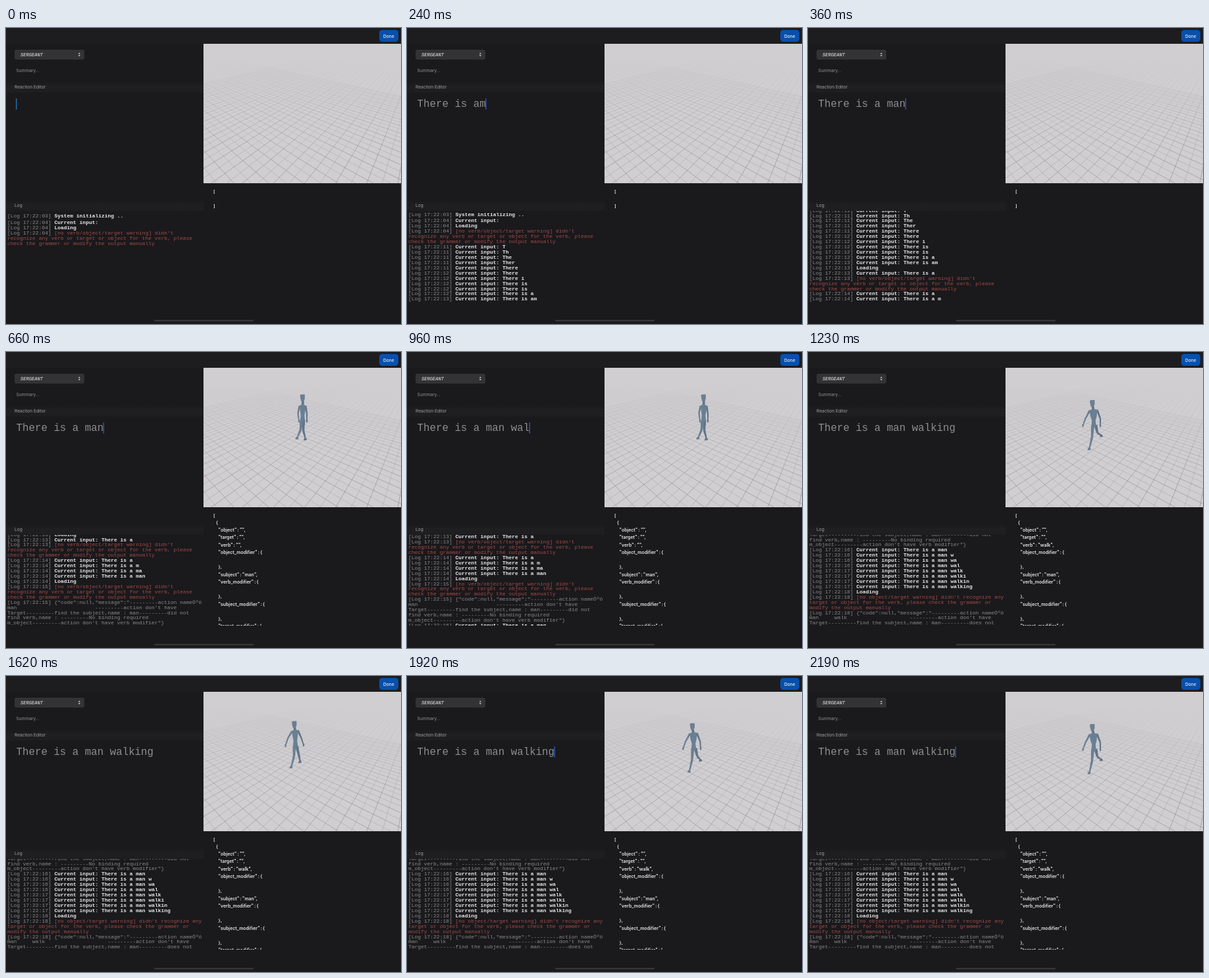
Recreate the animation shown at these times as an HTML page with a canvas. Size 600 by 450 pixels, loop 2220 ms.

```html
<!DOCTYPE html>
<html lang="en">
<head>
<meta charset="utf-8">
<title>Reaction editor</title>
<style>
  html, body { margin: 0; width: 100%; height: 100%; overflow: hidden; background: #1a191c; }
  canvas { display: block; width: 600px; height: 450px; }
</style>
</head>
<body>
<canvas id="stage"></canvas>
<script>
const LOOP = 2220, STEP = 30;
const MONO = '"Liberation Mono", "Courier New", monospace';
const SANS = 'Inter, "Open Sans", sans-serif';
const GREY = '#8a898b', WHITE = '#e9e8e9', RED = '#a24b49';

const canvas = document.getElementById('stage');
const ctx = canvas.getContext('2d');
const dpr = window.devicePixelRatio || 1;
canvas.width = 600 * dpr;
canvas.height = 450 * dpr;

function box(x, y, w, h, color, r = 0) {
  ctx.fillStyle = color;
  ctx.beginPath();
  ctx.roundRect(x, y, w, h, r);
  ctx.fill();
}

function text(str, x, y, font, color) {
  ctx.font = font;
  ctx.fillStyle = color;
  ctx.fillText(str, x, y);
}

function poly(points, color) {
  ctx.fillStyle = color;
  ctx.beginPath();
  points.forEach(([x, y]) => ctx.lineTo(x, y));
  ctx.closePath();
  ctx.fill();
}

function clipped(x, y, w, h, draw) {
  ctx.save();
  ctx.beginPath();
  ctx.rect(x, y, w, h);
  ctx.clip();
  draw();
  ctx.restore();
}

// Piecewise linear value over [time, value] pairs
function track(keys, t) {
  for (let i = 1; i < keys.length; i++) {
    const [t0, a] = keys[i - 1], [t1, b] = keys[i];
    if (t < t1) return a + (b - a) * Math.max(0, (t - t0) / (t1 - t0));
  }
  return keys[keys.length - 1][1];
}

// ---- Typing ----
const SENTENCE = 'There is a man walking';

function firstPart(k) {
  if (k === 11) return 'There is am';
  return SENTENCE.slice(0, k < 11 ? k : k - 2);
}

function typed(t) {
  if (t < 840) return firstPart(Math.max(0, Math.min(16, Math.floor((t - 36) / 18))));
  return SENTENCE.slice(0, 14 + Math.floor((t - 840) / 30));
}

// ---- Log ----
const log = [];
const add = (sec, str, color = WHITE) =>
  log.push({ stamp: '[Log 17:22:' + sec + ']', str, color });
const more = (str, color) => log.push({ stamp: '', str, color });
const input = (sec, str) => add(sec, 'Current input: ' + str);

function warn(sec) {
  add(sec, "[no verb/object/target warning] didn't", RED);
  more('recognize any verb or target or object for the verb, please', RED);
  more('check the grammer or modify the output manually', RED);
}

function report(sec, verb, gap, tail) {
  const dash = '-'.repeat(9);
  add(sec, '{"code":null,"message":"' + dash + 'action nameÔºö', GREY);
  more(('man     ' + verb).padEnd(gap) + dash + "action don't have", GREY);
  more('Target' + dash + 'find the subject,name : man' + dash + tail, GREY);
  more('find verb,name : ' + dash + 'No binding required', GREY);
  more('m_object' + dash + 'action don\'t have verb modifier"}', GREY);
}

add('03', 'System initializing ..');
input('04', '');
add('04', 'Loading');
warn('04');
for (let k = 1; k <= 11; k++) input(k < 6 ? 11 : k < 11 ? 12 : 13, firstPart(k));
add(13, 'Loading');
input(13, firstPart(12));
warn(13);
for (let k = 13; k <= 16; k++) input(14, firstPart(k));
add(14, 'Loading');
warn(15);
report(15, '', 28, 'did not');
for (let n = 15; n <= 22; n++) input(n < 19 ? 16 : 17, SENTENCE.slice(0, n));
add(18, 'Loading');
add(18, "[no object/target warning] didn't recognize any", RED);
more('target or object for the verb, please check the grammer or', RED);
more('modify the output manually', RED);
report(18, 'walk', 32, 'does not');

const LOG_END = [[30, 5], [360, 23], [405, 26], [450, 29], [480, 34], [940, 34],
  [960, 34.55], [1080, 40.4], [1110, 42], [1140, 43], [1200, 49]];

function drawLog(t) {
  const pitch = 7.93;
  let last = track(LOG_END, t);
  if (t < 480) last = Math.floor(last);
  const scroll = Math.max(0, last - 15.64) * pitch;
  clipped(0, 278, 300, 138, () => {
    for (let i = 0; i <= Math.ceil(last) && i < log.length; i++) {
      const { stamp, str, color } = log[i];
      const y = (i ? 288 + pitch * i : 286) - scroll + 2.4;
      if (y < 270 || y > 428) continue;
      text(stamp, 2, y, '7.95px ' + MONO, GREY);
      const font = (color === WHITE ? 'bold ' : '') + '7.95px ' + MONO;
      text(str, stamp ? 73.5 : 2, y, font, color);
    }
  });
}

// ---- JSON output ----
function drawJson(t) {
  const font = '600 6.9px ' + SANS;
  const put = (str, x, row) =>
    text(str.replaceAll(' ', '\u2009'), x, 250.5 + row * 11.26, font, WHITE);
  clipped(300, 238, 300, 178, () => {
    put('[', 315, 0);
    if (t < 480) return put(']', 315, 2);
    const verb = t < 1050 ? '' : 'walk';
    put('{', 319, 1);
    ['"object" : "",', '"target" : "",', '"verb" : "' + verb + '",',
      '"object_modifier" : {', '', '},', '"subject" : "man",',
      '"verb_modifier" : {', '', '},', '"subject_modifier" : {', '', '},',
      '"target_modifier" : {'].forEach((line, i) => put(line, 322.5, i + 2));
  });
}

// ---- 3D view ----
const HORIZON = 0;

function gridLines(vx, gap, shift) {
  const depth = 236 - HORIZON;
  for (let n = -40; n <= 40; n++) {
    ctx.strokeStyle = n % 2 ? 'rgba(122,115,119,.38)' : 'rgba(105,98,102,.58)';
    ctx.beginPath();
    ctx.moveTo(vx, HORIZON);
    ctx.lineTo(vx + depth * (n * gap + shift), 236);
    ctx.stroke();
  }
}

function drawFloor() {
  box(300, 24, 300, 212, '#d0ced1');
  ctx.lineWidth = 0.65;
  gridLines(130, 0.112, 0.02);
  gridLines(640, 0.1, 0.01);
  const fog = ctx.createLinearGradient(0, 24, 0, 200);
  [[0, 1], [0.12, 1], [0.3, 0.8], [0.55, 0.5], [1, 0]].forEach(([at, alpha]) =>
    fog.addColorStop(at, `rgba(208,206,209,${alpha})`));
  ctx.fillStyle = fog;
  ctx.fillRect(300, 24, 300, 176);
}

// Joints: head, hip, then shoulder/elbow/hand twice, hip/knee/foot twice
const IDLE = [[450.5, 70], [450.5, 103], [446, 82], [443.5, 93], [445, 105],
  [455, 82], [457, 93], [457, 105], [448.8, 104], [447.5, 118], [442.5, 130.5],
  [452, 104], [451.5, 119], [455, 132]];
const STRIDE = [[438, 74], [439.5, 105], [434.5, 84], [428, 95], [424.5, 106],
  [443.5, 83], [448.5, 94], [452, 105], [438, 106], [437.5, 122], [433.5, 138],
  [441.5, 106], [444.5, 119], [447, 130]];
const LIFT = [[432, 78.5], [434, 111], [428, 89], [421.5, 101], [417.5, 112],
  [439, 88], [444, 101], [444, 112], [432.5, 112], [431.5, 129], [427.5, 147],
  [437, 111], [439.5, 123], [446, 127]];
const SWAP = [...STRIDE.slice(0, 8), ...STRIDE.slice(11), ...STRIDE.slice(8, 11)];
const WALK = [[0.125, STRIDE], [0.5, LIFT], [0.8, SWAP], [1.125, STRIDE]];

function pose(t) {
  if (t < 1110) return IDLE;
  let p = ((t - 1110) / 240) % 1;
  if (p < 0.125) p += 1;
  const i = p < 0.5 ? 0 : p < 0.8 ? 1 : 2;
  const [p0, a] = WALK[i], [p1, b] = WALK[i + 1];
  const u = (p - p0) / (p1 - p0), e = u * u * (3 - 2 * u);
  return a.map(([x, y], j) => [x + (b[j][0] - x) * e, y + (b[j][1] - y) * e]);
}

function limb([x0, y0], [x1, y1], w0, w1, color) {
  const d = Math.hypot(x1 - x0, y1 - y0) || 1;
  const nx = (y0 - y1) / d / 2, ny = (x1 - x0) / d / 2;
  poly([[x0 + nx * w0, y0 + ny * w0], [x1 + nx * w1, y1 + ny * w1],
    [x1 - nx * w1, y1 - ny * w1], [x0 - nx * w0, y0 - ny * w0]], color);
}

function drawLeg([hip, knee, foot], color) {
  limb(hip, knee, 5, 3.3, color);
  limb(knee, foot, 3.6, 1.9, color);
  const [x, y] = foot;
  poly([[x - 1.2, y - 2], [x + 1.2, y - 1], [x + 2, y + 2], [x - 2.6, y + 2.4], [x - 3, y + 1]], color);
}

function drawArm([shoulder, elbow, hand], color) {
  limb(shoulder, elbow, 3.2, 2.3, color);
  limb(elbow, hand, 2.4, 1.7, color);
  const [x, y] = hand;
  poly([[x - 1.2, y - 2], [x + 1.2, y - 2], [x + 1.1, y + 2], [x - 0.8, y + 2.2]], color);
}

function drawMan(t) {
  const j = pose(t), main = '#6a7f94', dark = '#607489';
  const [hx, hy] = j[0], [px, py] = j[1], [lx, ly] = j[2], [rx, ry] = j[5];
  drawLeg(j.slice(11), dark);
  drawArm(j.slice(5, 8), dark);
  drawLeg(j.slice(8, 11), main);
  limb([hx + 0.5, hy + 3], [(lx + rx) / 2, ly], 3.4, 4, dark);
  const my = (ly + py) / 2 + 2;
  poly([[lx - 0.5, ly - 0.5], [hx + 0.5, ly - 2.5], [rx + 0.5, ry - 0.5], [rx - 0.5, my - 4],
    [px + 2.8, my + 2], [px + 3.8, py + 2], [px, py + 4], [px - 3.6, py + 2],
    [px - 2.8, my + 2], [lx + 1, my - 4]], main);
  drawArm(j.slice(2, 5), main);
  poly([[hx - 4, hy - 4.5], [hx - 1.5, hy - 5.6], [hx + 3.4, hy - 5.4], [hx + 3.4, hy + 1],
    [hx + 1.6, hy + 5], [hx - 2, hy + 5], [hx - 3.2, hy + 1]], main);
}

// ---- Interface ----
function strip(y, h, label) {
  const g = ctx.createLinearGradient(0, y, 0, y + h);
  g.addColorStop(0, '#1a191c');
  g.addColorStop(0.4, '#1f1e21');
  g.addColorStop(1, '#1e1d20');
  box(0, y, 300, h, g);
  text(label, 13, y + h / 2 + 2.4, '6.6px ' + SANS, '#a3a2a4');
}

function drawFrame() {
  box(0, 0, 600, 450, '#1a191c');
  box(0, 0, 600, 24, '#1d1d1f');
  box(567, 3, 29, 18, '#0850ac', 4.5);
  text('Done', 573, 14.9, '500 6.6px ' + SANS, '#e6edf6');
  box(13, 33, 106, 15, '#333336', 3);
  text('SERGEANT', 22, 42.7, 'italic 7.1px ' + MONO, '#f0eff0');
  poly([[109.8, 39.6], [111.3, 37.6], [112.8, 39.6]], '#e0dfe0');
  poly([[109.8, 41.2], [111.3, 43.2], [112.8, 41.2]], '#e0dfe0');
  text('Summary...', 15.5, 67.2, '6.6px ' + SANS, '#949395');
  strip(82, 16, 'Reaction Editor');
  strip(262, 16, 'Log');
  box(225, 443.8, 151, 2.2, '#38373a', 1.1);
}

function drawEditor(t) {
  const str = typed(t);
  text(str, 15.5, 120.2, '15.8px ' + MONO, '#8d8c8e');
  if (t < 1080 || t % 200 >= 100) {
    box(15 + ctx.measureText(str).width, 107, 1.3, 17, str ? '#2961c2' : '#2a78b4');
  }
}

function render(t) {
  ctx.setTransform(dpr, 0, 0, dpr, 0, 0);
  drawFrame();
  drawEditor(t);
  drawLog(t);
  drawJson(t);
  clipped(300, 24, 300, 212, () => {
    drawFloor();
    if (t >= 480) drawMan(t);
  });
}

const start = performance.now();
function tick() {
  const t = (performance.now() - start) % LOOP;
  render(Math.floor(t / STEP) * STEP);
  requestAnimationFrame(tick);
}
tick();
</script>
</body>
</html>
```
